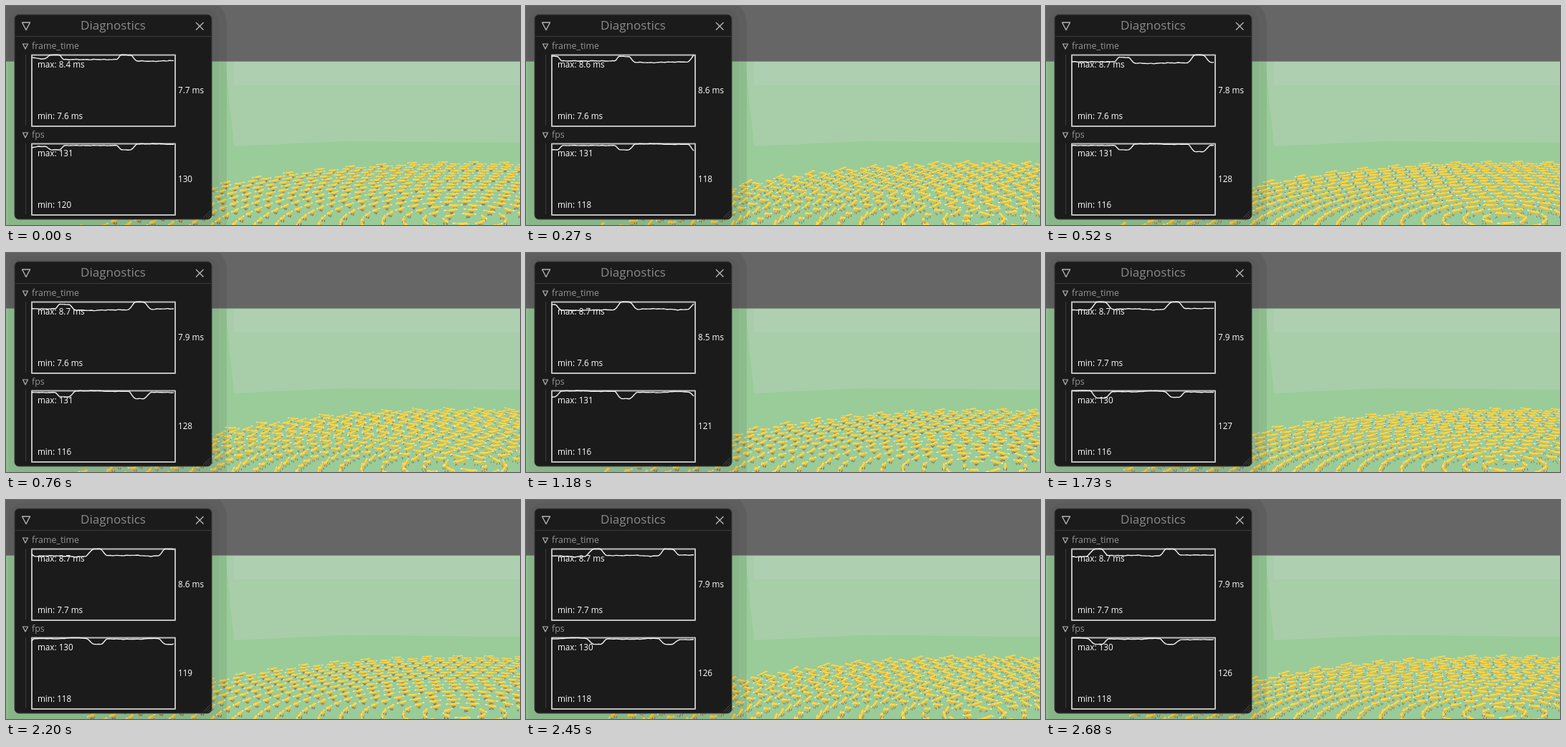
These frames come from a looping animation (717 by 306 pixels, 2.7 s). An HTML page with a canvas:

```html
<!DOCTYPE html>
<html lang="en">
<head>
<meta charset="utf-8">
<title>Diagnostics</title>
<style>
  html, body { margin: 0; width: 100%; height: 100%; overflow: hidden; background: #666; }
  canvas { display: block; }
</style>
</head>
<body>
<canvas id="stage" width="717" height="306"></canvas>
<script>
const ctx = document.getElementById('stage').getContext('2d');
const W = 717, H = 306, LOOP = 2700;
const FONT = '"Open Sans", "Noto Sans", sans-serif';

// ---------- herd ----------
const FOXES = 1000, GAP = 2, SPEED = 2, SLOWDOWN = 0.525, STRIDE = 0.579;
const rings = [];
for (let left = FOXES, r = GAP; left > 0; r += GAP) {
  const count = Math.min(left, Math.floor(2 * Math.PI * r / GAP));
  rings.push({ r, count, dir: rings.length % 2 ? 1 : -1 });
  left -= count;
}

// ---------- camera ----------
const reach = (rings.length + 1) * GAP * 0.8;
const camDist = reach * Math.hypot(1.25, 1.5), camHeight = reach * 0.5;
const azimuth = Math.atan2(1.5, 1.25);
const pitch = Math.atan2(camHeight, camDist * 0.8);
const cosP = Math.cos(pitch), sinP = Math.sin(pitch), FOCAL = 869;

function project(right, up, ahead) {
  const drop = camHeight - up;
  const depth = ahead * cosP + drop * sinP;
  return [640 + FOCAL * right / depth, 355 + FOCAL * (drop * cosP - ahead * sinP) / depth];
}

function drawFox(fox, stride) {
  const { right, ahead, a, dir } = fox;
  const scale = FOCAL / (ahead * cosP + camHeight * sinP);
  const fr = Math.cos(a) * dir, fa = -Math.sin(a) * dir;
  const at = ([z, y, side = 0]) =>
    project(right + fr * z - fa * side, y, ahead + fa * z + fr * side);
  const limb = (color, width, ...points) => {
    ctx.strokeStyle = color;
    ctx.lineWidth = width * scale;
    ctx.beginPath();
    for (const p of points) ctx.lineTo(...at(p));
    ctx.stroke();
  };
  const reachOut = -Math.cos(2 * Math.PI * stride);
  const tilt = 0.09 * Math.sin(2 * Math.PI * stride);
  const y = 0.47 + 0.04 * reachOut, len = 0.31 + 0.05 * reachOut;
  const hip = y - tilt, chest = y + tilt;

  for (const side of [-0.13, 0.13]) {
    for (const [end, height] of [[-1, hip], [1, chest]]) {
      const knee = [end * (len + 0.08 + reachOut * 0.12), 0.25, side];
      const foot = [end * (len + reachOut * 0.34) + side * 0.8, 0.06, side];
      limb('#806b5e', 0.065, knee, foot);
      limb('#edbd3c', 0.085, [end * len, height - 0.04, side], knee);
    }
  }
  limb('#e8b83a', 0.17, [-len, hip - 0.06], [len, chest - 0.06]);
  limb('#ffdb45', 0.18, [-len, hip + 0.03], [len, chest + 0.03]);
  limb('#f9cf40', 0.12, [-len, hip + 0.03], [-len - 0.34, hip + 0.06 - tilt]);
  limb('#f7f4ea', 0.1, [-len - 0.4, hip + 0.06 - tilt], [-len - 0.52, hip + 0.04 - tilt]);
  limb('#f0ece2', 0.09, [len + 0.22, chest + 0.07], [len + 0.36, chest + 0.03]);
  limb('#ffdd48', 0.17, [len + 0.05, chest + 0.1], [len + 0.2, chest + 0.11]);
  for (const side of [-0.09, 0.09])
    limb('#e2b545', 0.055, [len + 0.1, chest + 0.18, side], [len + 0.08, chest + 0.28, side]);
}

function drawHerd(time) {
  const t = time * SLOWDOWN, herd = [];
  for (const { r, count, dir } of rings) {
    for (let i = 0; i < count; i++) {
      const a = i * 2 * Math.PI / count - azimuth - Math.PI + dir * SPEED * t / r;
      const ahead = camDist + r * Math.cos(a), right = r * Math.sin(a);
      if (ahead > 56) herd.push({ ahead, right, a, dir });
    }
  }
  herd.sort((p, q) => q.ahead - p.ahead);
  ctx.lineCap = 'round';
  ctx.lineJoin = 'round';
  const stride = t / STRIDE % 1;
  for (const fox of herd) drawFox(fox, stride);
}

// ---------- scenery ----------
function fillRect(color, x, y, w, h) {
  ctx.fillStyle = color;
  ctx.fillRect(x, y, w, h);
}

function polygon(color, ...pts) {
  ctx.fillStyle = color;
  ctx.beginPath();
  for (const p of pts) ctx.lineTo(...p);
  ctx.fill();
}

function drawGround() {
  fillRect('#666666', 0, 0, W, 78);
  fillRect('#99cc99', 0, 77.5, W, H);
  polygon('#a7cea8', [306, 78], [W, 78], [W, 191], [470, 189], [318, 196]);
  polygon('#aecfb0', [318, 78], [W, 78], [W, 111], [318, 111]);
}

function drawShadow() {
  const layers = [[308, -10, 34, 0.08], [297, 4, 20, 0.03]];
  for (const [right, top, radius, alpha] of layers) {
    ctx.fillStyle = `rgba(0,0,0,${alpha})`;
    ctx.beginPath();
    ctx.roundRect(300 - right, top, 2 * right - 300, 360, radius);
    ctx.fill();
  }
}

// ---------- measurements ----------
const PX_PER_MS = 0.113, FIRST = 36, LAST = 234;
const baseline = [[36, 8.1], [46, 7.95], [56, 7.95], [85, 7.85], [155, 7.85], [182, 7.68],
  [210, 7.64], [228, 7.72], [262, 7.72], [295, 7.82], [320, 7.86], [345, 7.72],
  [372, 7.85], [420, 7.9], [435, 7.9], [450, 7.8], [490, 7.95], [545, 7.94]];
// rise start, rise end, fall start, fall end, frame-time peak, smoothed peak
const spikes = [
  [54, 63, 74, 81, 8.4, 8.34], [154, 161, 173, 183, 8.4, 8.34],
  [256, 267, 277, 289, 8.7, 8.59], [359, 372, 380, 390, 8.7, 8.49],
  [461, 471, 480, 491, 8.7, 8.49]];

function ramp(s, a, b) {
  const k = Math.min(1, Math.max(0, (s - a) / (b - a)));
  return k * k * (3 - 2 * k);
}

function baseAt(s) {
  const i = Math.max(1, baseline.findIndex(p => p[0] >= s));
  const [x0, y0] = baseline[i - 1], [x1, y1] = baseline[i];
  return y0 + (y1 - y0) * Math.min(1, (s - x0) / (x1 - x0));
}

function level(s, base, peakIndex) {
  for (const p of spikes)
    base += (p[peakIndex] - base) * ramp(s, p[0], p[1]) * (1 - ramp(s, p[2], p[3]));
  return base;
}

const jitter = s => Math.sin(s * 0.47) * 0.5 + Math.sin(s * 0.83 + 1) * 0.35 + Math.sin(s * 0.21) * 0.3;
const frameTime = s => level(s, baseAt(s), 4);
const fps = s => 1000 / level(s - 0.5, baseAt(s) - 0.03, 5);

// ---------- panel ----------
function text(str, x, y, color = '#fff', size = 11.7, align = 'left') {
  ctx.font = `${size}px ${FONT}`;
  ctx.textAlign = align;
  ctx.fillStyle = color;
  ctx.fillText(str, x, y);
}

function line(color, width, ...pts) {
  ctx.strokeStyle = color;
  ctx.lineWidth = width;
  ctx.beginPath();
  for (const p of pts) ctx.lineTo(...p);
  ctx.stroke();
}

function arrow(x, y, w, h, width) {
  line('#b4b4b4', width, [x, y], [x + w, y], [x + w / 2, y + h], [x, y], [x + w, y]);
}

function drawPlot(top, label, signal, noise, format, time) {
  const shift = time * PX_PER_MS, xs = [];
  for (let x = FIRST; x <= LAST; x += 1.65) xs.push(x);
  xs.push(LAST);
  const values = xs.map(x => signal(x + shift));
  const max = Math.max(...values), min = Math.min(...values);

  arrow(23.5, top - 15, 7, 7, 1.2);
  text(label, 36, top - 8, '#969696', 12.4);
  line('#3c3c3c', 1, [27.5, top], [27.5, top + 99]);
  ctx.strokeStyle = '#bebebe';
  ctx.lineWidth = 2;
  ctx.strokeRect(36, top + 0.5, 200, 99.5);
  text('max: ' + format(max), 44, top + 18);
  text('min: ' + format(min), 44, top + 90);
  text(format(values[values.length - 1]), 240, top + 54);
  line('#f4f4f4', 1.4, ...xs.map((x, i) => {
    const v = Math.min(max, values[i] + noise * jitter(x + shift));
    return [x, top + 99.3 - 99 * v / max];
  }));
}

function drawPanel(time) {
  ctx.beginPath();
  ctx.roundRect(12, 12, 275, 286, 6);
  ctx.fillStyle = '#1b1b1b';
  ctx.fill();
  ctx.strokeStyle = '#3c3c3c';
  ctx.lineWidth = 1;
  ctx.stroke();
  ctx.lineCap = 'butt';
  ctx.lineJoin = 'round';
  line('#3c3c3c', 1, [13, 42.5], [286, 42.5]);
  arrow(22.5, 23, 11, 10.5, 1.4);
  text('Diagnostics', 149.5, 33, '#8c8c8c', 17, 'center');
  line('#b4b4b4', 1.4, [265, 23], [275.5, 33.5]);
  line('#b4b4b4', 1.4, [275.5, 23], [265, 33.5]);
  for (const d of [3, 6.5, 10]) line('#484848', 1, [285 - d, 296], [285, 296 - d]);
  drawPlot(68, 'frame_time', frameTime, 0.035, v => v.toFixed(1) + ' ms', time);
  drawPlot(192, 'fps', fps, 0.4, v => v.toFixed(0), time);
}

function render(now) {
  const time = now % LOOP;
  drawGround();
  drawHerd(time / 1000);
  drawShadow();
  drawPanel(time);
}

const start = performance.now();
(function tick() {
  render(performance.now() - start);
  requestAnimationFrame(tick);
})();
</script>
</body>
</html>
```
